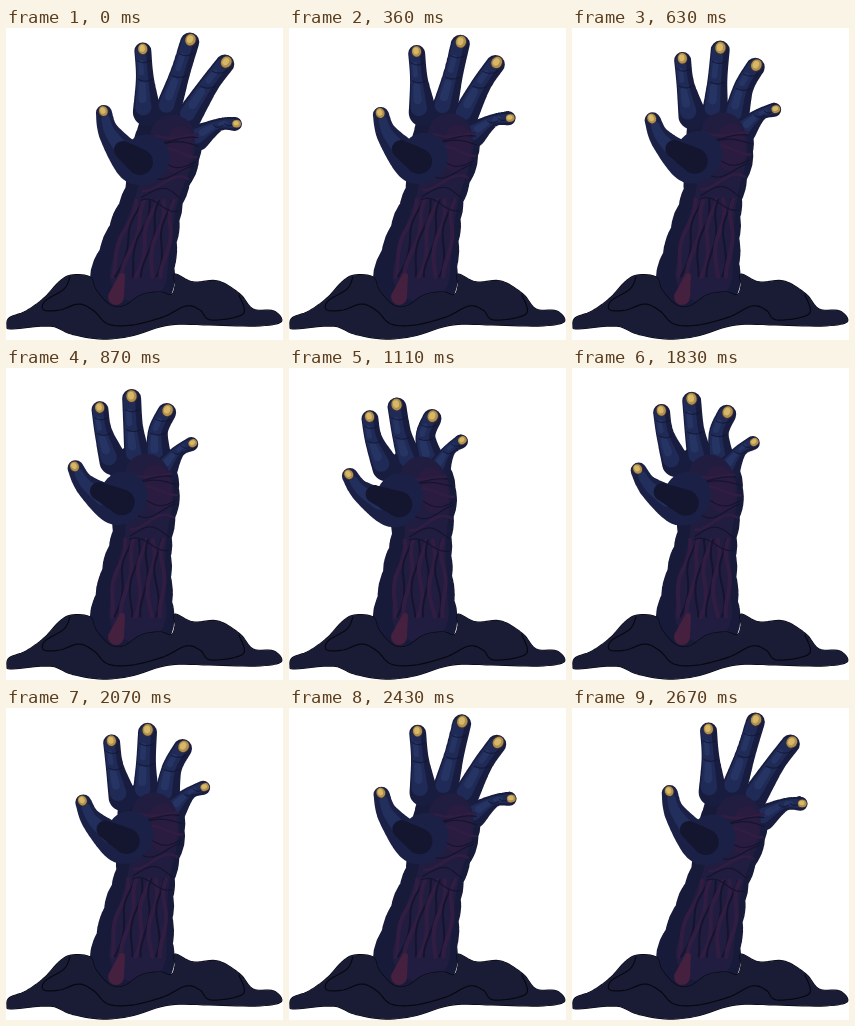
Recreate the animation shown at these times as an HTML page with a canvas. Size 277 by 312 pixels, loop 2700 ms.

```html
<!DOCTYPE html>
<html lang="en">
<head>
<meta charset="utf-8">
<title>Hand rising from the ground</title>
<style>
html, body { margin: 0; width: 100%; height: 100%; overflow: hidden; background: #fff; }
canvas { display: block; }
</style>
</head>
<body>
<canvas id="stage" width="277" height="312"></canvas>
<script>
const ctx = document.getElementById('stage').getContext('2d');
const LOOP = 2700, STEP = 30;

// Joints: x, y leaning right, x, y leaning left, radius
const arm = [
  [163, 106, 126, 109, 31], [160, 126, 132, 126, 34], [148, 168, 132, 168, 30],
  [137, 207, 128, 207, 35], [126, 252, 126, 252, 42]
];
const thumb = [[98, 85, 59, 110, 8], [104, 106, 72, 126, 11], [130, 136, 103, 140, 20], [146, 122, 112, 119, 25]];
const thumbPad = [[117, 122, 84, 127, 9], [134, 134, 109, 137, 13]];
const fingers = [
  [[137, 23, 78, 53, 8.5], [139, 50, 82, 74, 9], [141, 84, 95, 101, 14]],
  [[184, 14, 104, 41, 9.5], [174, 46, 110, 70, 10], [162, 82, 120, 96, 13]],
  [[219, 36, 139, 52, 9.5], [203, 57, 133, 71, 10], [182, 90, 142, 97, 13]],
  [[229, 96, 169, 73, 7], [213, 97, 157, 83, 6.5], [191, 110, 146, 104, 13]]
];

const moundEdge = [
  [1, 299], [3, 290], [20, 283], [38, 270], [54, 253], [66, 247], [84, 249], [90, 262], [104, 277], [118, 278],
  [135, 267], [154, 264], [165, 267], [169, 258], [169, 246], [187, 254], [212, 253], [234, 266], [247, 281],
  [268, 283], [275, 294], [250, 298], [205, 297], [163, 297], [125, 308], [95, 311], [65, 306], [44, 298], [6, 301]
];
const ridge = [
  [64, 249], [58, 261], [39, 273], [38, 282], [54, 282], [73, 276], [88, 283], [102, 296], [126, 297],
  [157, 289], [180, 278], [194, 282], [205, 292], [237, 286], [233, 267]
];

const mix = (a, b, t) => a + (b - a) * t;

// Catmull-Rom position, v from 0 to 1 over all points
function spline(points, v) {
  const last = points.length - 1;
  const i = Math.min(last - 1, Math.floor(v * last)), t = v * last - i;
  const at = k => points[Math.max(0, Math.min(last, k))];
  const [a, b, c, d] = [at(i - 1), at(i), at(i + 1), at(i + 2)];
  return b.map((_, n) => b[n] + t / 2 * (c[n] - a[n] +
    t * (2 * a[n] - 5 * b[n] + 4 * c[n] - d[n] + t * (3 * (b[n] - c[n]) + d[n] - a[n]))));
}

// Joints travel on a shallow arc between the two leans
function pose(joints, lean) {
  return joints.map(([ax, ay, bx, by, r]) => {
    const lift = 16 * lean * (1 - lean) * Math.min(1, (ax - bx) / 40);
    return [mix(ax, bx, lean), mix(ay, by, lean) - lift, r];
  });
}

function limb(joints, color, scale = 1, shift = 0, from = 0, to = 1, bumps = 0) {
  ctx.fillStyle = color;
  ctx.beginPath();
  for (let i = 0; i <= 60; i++) {
    const v = mix(from, to, i / 60);
    const [x, y, r] = spline(joints, v);
    ctx.moveTo(x, y);
    ctx.arc(x + shift * r, y, r * scale + bumps * Math.sin(v * 47), 0, 7);
  }
  ctx.fill();
}

// Line through point(0) ... point(1)
function curve(point, color, width) {
  ctx.beginPath();
  for (let i = 0; i <= 24; i++) ctx.lineTo(...point(i / 24));
  ctx.strokeStyle = color;
  ctx.lineWidth = width;
  ctx.stroke();
}

function outline(points, color, width) {
  ctx.beginPath();
  for (let i = 0; i <= 200; i++) ctx.lineTo(...spline(points, i / 200));
  ctx.strokeStyle = color;
  ctx.lineWidth = width;
  ctx.stroke();
}

function oval(x, y, rx, ry, angle, color) {
  ctx.fillStyle = color;
  ctx.beginPath();
  ctx.ellipse(x, y, rx, ry, angle, 0, 7);
  ctx.fill();
}

function nail([[x, y, r], [midX, midY]]) {
  const angle = Math.atan2(y - midY, x - midX);
  const nx = x + Math.cos(angle) * r * 0.25, ny = y + Math.sin(angle) * r * 0.25;
  oval(nx, ny, r * 0.72, r * 0.64, angle, '#3a3038');
  oval(nx, ny, r * 0.62, r * 0.54, angle, '#b08f4e');
  oval(nx - 0.5, ny - 0.5, r * 0.4, r * 0.32, angle, '#d6b968');
}

function drawFinger(joints) {
  limb(joints, '#181d40');
  limb(joints, '#1f2a56', 0.62, -0.25, 0, 0.9);
  limb(joints, '#263463', 0.3, -0.35, 0.25, 0.42);
  limb(joints, '#263463', 0.35, -0.3, 0.6, 0.78);
  for (const v of [0.22, 0.52]) {
    const [x, y, r] = spline(joints, v);
    curve(u => [x + (u - 0.5) * 1.5 * r, y + 2 * Math.sin(u * Math.PI)], '#12152f', 1);
  }
  nail(joints);
}

function drawSkin(joints) {
  const on = (u, v) => {
    const [x, y, r] = spline(joints, v);
    return [x + u * r, y];
  };
  limb(joints, '#211d41', 0.7, 0.12, 0.06, 0.95);
  limb(joints, '#2a1c40', 0.38, 0.38, 0.08, 0.3);

  // Sinews along the forearm, alternating ridge and groove
  for (let i = 0; i < 9; i++) {
    const side = -0.55 + i * 0.16;
    const sinew = t => on(side + 0.07 * Math.sin(t * 8 + i * 2), mix(0.53, 0.97, t));
    curve(sinew, i % 2 ? '#15142e' : '#321d42', i % 2 ? 2 : 4);
  }
  // Creases across palm and wrist
  for (let i = 0; i < 9; i++) {
    const crease = t => on(mix(-0.4, 0.92, t), 0.04 + i * 0.065 + 0.04 * Math.sin(t * 4 + i * 1.3));
    curve(crease, i % 3 ? '#15142f' : '#321d42', i % 3 ? 1.3 : 2.5);
  }
}

function draw(time) {
  const swing = 0.526 * (1 - Math.cos((time - 35) / LOOP * 2 * Math.PI));
  const lean = swing ** 0.95;
  const armPose = pose(arm, lean), thumbPose = pose(thumb, lean);
  ctx.fillStyle = '#fff';
  ctx.fillRect(0, 0, 277, 312);
  ctx.lineCap = ctx.lineJoin = 'round';

  limb(armPose, '#171a39', 1, 0, 0, 1, 0.8);
  for (const finger of fingers) drawFinger(pose(finger, lean));
  drawSkin(armPose);
  limb([[116, 248, 3], [110, 269, 8]], '#46203f');

  limb(thumbPose, '#1b2146', 1, 0, 0, 0.85);
  limb(thumbPose, '#222e5b', 0.5, 0.1, 0.12, 0.5);
  limb(pose(thumbPad, lean), '#14162f');
  nail(thumbPose);

  ctx.fillStyle = '#1a1c36';
  outline([...moundEdge, moundEdge[0]], '#06070f', 1.2);
  ctx.fill();
  outline(ridge, '#06070f', 1.2);
}

function tick() {
  draw(Math.floor(performance.now() % LOOP / STEP) * STEP);
  requestAnimationFrame(tick);
}
tick();
</script>
</body>
</html>
```
